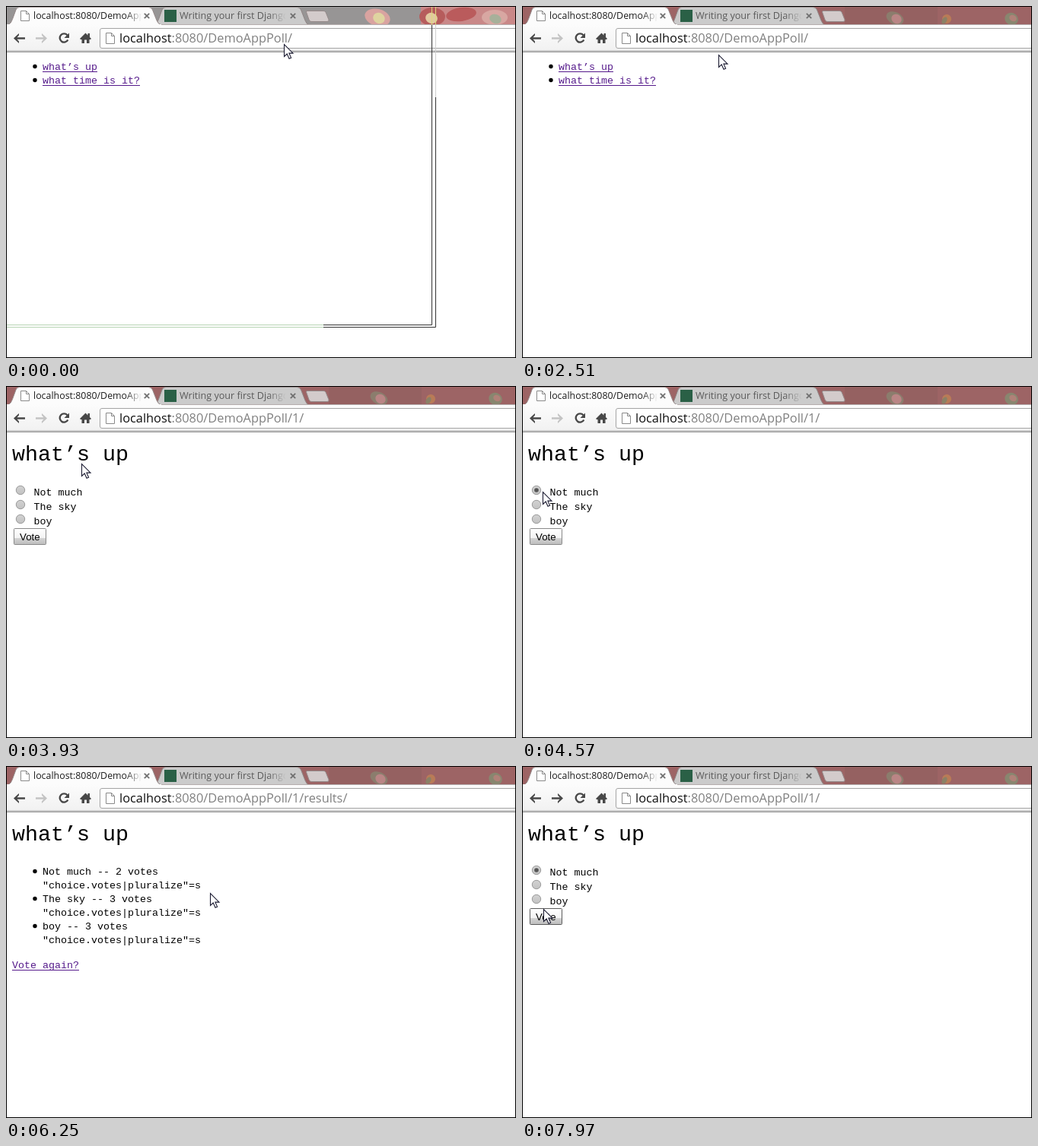
An HTML page that plays this animation: 670x463 px, repeating every 8 s.

```html
<!DOCTYPE html>
<html lang="en">
<head>
<meta charset="utf-8">
<title>Poll demo</title>
<style>
html, body { margin: 0; width: 100%; height: 100%; overflow: hidden; background: #fff; }
svg { display: block; width: 670px; height: 463px; }
text { white-space: pre; }
.mono { font: 13.333px "Liberation Mono", monospace; }
.head { font: 28.333px "Liberation Mono", monospace; }
.ui { font: 12.4px "Open Sans", "Noto Sans", sans-serif; }
.url { font: 16.36px "Open Sans", "Noto Sans", sans-serif; }
.btn { font: 13.333px "Liberation Sans", Arial, sans-serif; }
</style>
</head>
<body>
<svg id="stage" viewBox="0 0 670 463" xmlns="http://www.w3.org/2000/svg"></svg>
<script>
const LOOP = 8000;
const PURPLE = '#551a8b';
const stage = document.getElementById('stage');
const $ = id => document.getElementById(id);

// Drawing helpers that return markup
const rect = (x, y, w, h, fill, more = '') =>
  `<rect x="${x}" y="${y}" width="${w}" height="${h}" fill="${fill}" ${more}/>`;
const path = (d, fill, more = '') => `<path d="${d}" fill="${fill}" ${more}/>`;
const line = (d, color, width, more = '') =>
  path(d, 'none', `stroke="${color}" stroke-width="${width}" ${more}`);
const text = (cls, x, y, str, fill = '#000', more = '') =>
  `<text class="${cls}" x="${x}" y="${y}" fill="${fill}" ${more}>${str}</text>`;
const blob = (x, y, rx, ry, fill, turn = 0) =>
  `<ellipse cx="${x}" cy="${y}" rx="${rx}" ry="${ry}" fill="${fill}" transform="rotate(${turn} ${x} ${y})"/>`;
const dot = (x, y, r, fill, more = '') =>
  `<circle cx="${x}" cy="${y}" r="${r}" fill="${fill}" ${more}/>`;
const group = (id, body) => `<g id="${id}">${body}</g>`;
const link = (id, x, y, str) => `<g id="${id}" fill="${PURPLE}">` +
  text('mono', x, y, str, 'inherit').replace('fill="inherit"', '') +
  `<rect x="${x}" y="${y + 2}" width="${str.length * 8}" height="1"/></g>`;
const ramp = (id, x1, x2, color) =>
  `<linearGradient id="${id}" gradientUnits="userSpaceOnUse" x1="${x1}" x2="${x2}">
   <stop stop-color="${color}"/><stop offset="1" stop-color="${color}" stop-opacity="0"/></linearGradient>`;
const shade = (id, stops) =>
  `<linearGradient id="${id}" x2="0" y2="1">` +
  stops.map(([at, c]) => `<stop offset="${at}" stop-color="${c}"/>`).join('') + '</linearGradient>';
const sheet = (x, y, w, h) =>
  path(`M${x + .5} ${y + .5}h${w - 5}l4 4v${h - 5}h${1 - w}z`, '#fff', 'stroke="#8a8a8a"') +
  line(`M${x + w - 4.5} ${y + .5}v4h4`, '#8a8a8a', 1);
const cross = (x, y, r, color, width) =>
  line(`M${x - r} ${y - r}l${2 * r} ${2 * r}M${x + r} ${y - r}l${-2 * r} ${2 * r}`, color, width);

function desktop() {
  const early = rect(0, 0, 670, 25, '#979595') +
    rect(545, 0, 125, 25, '#c98888') +
    blob(488, 15, 17, 11, '#d9a3a0', 15) + blob(490, 16, 8, 7, '#dfd3a0', 30) +
    blob(560, 14, 17, 12, '#b65c5c') + blob(559, 16, 8, 7, '#e2c9a0', 20) +
    blob(598, 11, 20, 9, '#ba5b5c', -8) + blob(642, 15, 17, 10, '#d8a7a2') +
    blob(643, 17, 8, 6, '#a7b09a', 20);
  const late = rect(0, 0, 670, 25, '#9d6465') + rect(424, 1, 122, 24, '#956161') +
    blob(490, 16, 12, 8, '#8b7d6d', 25) + blob(492, 17, 7, 6, '#ba8585', 35) +
    blob(558, 17, 6, 6, '#b97b57', 30) + blob(555, 19, 3, 5, '#8a8166', 30) +
    blob(643, 17, 9, 8, '#88866f', 25) + blob(645, 16, 5, 4, '#b08178', 30);
  return group('early', early) + group('late', late);
}

function chrome() {
  const tabs =
    path('M194 25C198 24 199 21 201 16L205 5Q206 1.5 210 1.5H382Q386 1.5 387.500 5L393 19Q395 24 398 25z', '#cbcbcb', 'stroke="#8f8484"') +
    path('M394.500 8Q394 6.500 396 6.500H417Q419 6.500 420 8L424 18Q424.500 20.500 422 20.500H401Q399 20.500 398 18z', '#d3cbcb', 'stroke="#958a8a"') +
    path('M1 25C6 24 7 21 9 16L13 5Q14 1.500 18 1.500H187Q191 1.500 192.500 5L198 19Q200 24 204 25z', '#fcfcfc', 'stroke="#958989"');
  const bar = rect(1, 24, 668, 36, 'url(#barFill)') +
    rect(204, 24, 466, 1, '#b5adad') + rect(1, 58, 668, 1, '#d0d0d0') +
    rect(1, 59, 668, 1, '#c4c4c4') + rect(1, 60, 668, 1, '#929292') +
    path('M670 29.500H126Q123.500 29.500 123.500 32V53Q123.500 55.500 126 55.500H670', '#fff', 'stroke="#a4a4a4"');
  const arrow = 'M0 0L7 -6.500V-4L4.500 -1.300H15V1.300H4.500L7 4V6.500z';
  const nav =
    group('hover', rect(4.5, 29.5, 26, 26, '#fff', 'rx="2" stroke="#a9a9a9"')) +
    path(arrow, '#484848', 'transform="translate(10 42.500)"') +
    `<g id="fwd" transform="translate(54 42.500) scale(-1 1)">${path(arrow, 'inherit').replace('fill="inherit"', '')}</g>` +
    group('reload', line('M80.500 38.300A5.600 5.600 0 1 0 81.300 44.500', '#484848', 2.4) +
      path('M83 35.500V42H76.500z', '#484848')) +
    group('stop', cross(75.5, 42.5, 5, '#484848', 3)) +
    path('M97 43L104.500 35.500L107.500 38.500V36H110V41L112 43L111 44H109.500V49H106V44.500H103V49H99.500V44H98z', '#484848');
  const labels =
    group('favicon', sheet(19, 6, 12, 14)) +
    group('spinner', line('M24 7A6.500 6.500 0 0 1 30.500 17', '#a8a8a8', 1.8)) +
    text('ui', 36, 17, 'localhost:8080/DemoAppPoll', 'url(#fade1)') +
    cross(185, 13, 3.2, '#707070', 1.8) +
    rect(208, 5, 16, 16, '#2a6046') +
    text('ui', 228, 17, 'Writing your first Django', 'url(#fade2)', 'style="font-size:12.6px"') +
    cross(377, 13, 3.2, '#707070', 1.8) +
    sheet(131, 35, 12, 15);
  const address = group('mark', rect(149, 31, 228, 21, '#3399ff')) +
    `<text class="url" x="149" y="48"><tspan id="host">localhost</tspan><tspan id="rest"></tspan></text>` +
    group('caret', rect(376, 31, 1, 21, '#000'));
  return tabs + bar + nav + labels + address;
}

function pages() {
  const list = dot(38, 79.5, 2.7, '#000') + dot(38, 97.5, 2.7, '#000') +
    link('ask', 48, 84, 'what’s up') + link('time', 48, 102, 'what time is it?');
  const title = text('head', 8, 98, 'what’s up');
  const choices = ['Not much', 'The sky', 'boy'];
  const form = title + choices.map((c, i) =>
    dot(19, 137 + 19 * i, 5.7, 'url(#radioFill)', 'stroke="#9b9b9b"') +
    text('mono', 36.5, 144 + 19 * i, c)).join('') +
    group('picked', dot(19, 137, 2.8, '#555')) +
    rect(10.5, 187.5, 42, 21, 'url(#btnFill)', 'id="vote" rx="1"') +
    text('btn', 18, 203, 'Vote');
  const results = title + choices.map((c, i) => {
    const y = 143 + 36 * i;
    return dot(38, y - 4.5, 2.7, '#000') +
      text('mono', 48, y, `${c} -- ${i ? 3 : 2} votes`) +
      text('mono', 48, y + 18, '"choice.votes|pluralize"=s');
  }).join('') + link('again', 8, 266, 'Vote again?');
  return group('list', list) + group('form', form) + group('results', results);
}

const outline = group('outline',
  line('M559.500 1V25M564.500 1V25', '#dcd77c', 1) +
  line('M564.500 25V120', '#cfcfcf', 1) +
  line('M559.500 25V419.500H417M564.500 120V422.500H417', '#333', 1) +
  line('M1 419.500H417M1 422.500H417', '#b5d3b2', 1));

stage.innerHTML = '<defs>' + ramp('fade1', 158, 178, '#1c1c1c') + ramp('fade2', 345, 368, '#595959') +
  shade('barFill', [[0, '#fcfcfc'], [1, '#f1f1f1']]) +
  shade('radioFill', [[0, '#d2d2d2'], [1, '#c2c2c2']]) +
  shade('btnFill', [[0, '#fff'], [.6, '#f3f3f3'], [.62, '#d2d2d2'], [1, '#bdbdbd']]) + '</defs>' +
  rect(0, 0, 670, 463, '#fff') + desktop() + chrome() + pages() + outline +
  group('cursor', path('M.5 .5V16.500L4.200 13L7 19.300L9.600 18.200L6.900 12.100H12z', '#fff',
    'stroke="#1d1d33" stroke-width="1.100"')) +
  rect(.5, .5, 669, 462, 'none', 'stroke="#000"');

// Pointer moves: start, end, number of jumps, target x, target y
const moves = [
  [100, 330, 5, 398, 45], [1700, 1700, 1, 290, 60], [2510, 2800, 6, 96, 82],
  [3690, 3760, 2, 109, 97], [3930, 4330, 8, 27, 139], [4610, 4740, 3, 30, 193],
  [5060, 5210, 4, 172, 176], [5360, 5440, 3, 272, 168], [6250, 6250, 1, 268, 167],
  [6310, 6930, 11, 18, 45], [7130, 7190, 2, 26, 57], [7230, 7850, 11, 31, 183],
  [7910, 7970, 2, 28, 188]
];

function pointer(t) {
  let x = 365, y = 50;
  for (const [from, to, n, tx, ty] of moves) {
    if (t < from) break;
    const jump = n > 1 ? Math.floor((t - from) / (to - from) * (n - 1) + 1e-6) + 1 : 1;
    const k = Math.min(1, jump / n);
    x += (tx - x) * k;
    y += (ty - y) * k;
  }
  return [Math.round(x), Math.round(y)];
}

const show = (id, on) => { $(id).style.display = on ? '' : 'none'; };

function draw(t) {
  const within = (a, b) => t >= a && t < b;
  const view = t < 3320 ? 'list' : within(5360, 7060) ? 'results' : 'form';
  const loading = within(3220, 3460) || within(5000, 5440) || within(7000, 7060);
  const marked = within(470, 570);
  const [x, y] = pointer(t);

  show('early', t < 100);
  show('late', t >= 100);
  show('outline', t < 100);
  for (const id of ['list', 'form', 'results']) show(id, id === view);

  show('favicon', !loading);
  show('spinner', loading);
  show('reload', !loading);
  show('stop', loading);
  const turn = -Math.floor((t - 3220) / 70) * 40;
  $('spinner').setAttribute('transform', `rotate(${turn} 25 13)`);

  show('hover', within(6860, 7250));
  $('fwd').setAttribute('fill', t >= 7060 ? '#484848' : '#c3c3c3');
  show('mark', marked);
  show('caret', within(570, 1330));
  $('host').setAttribute('fill', marked ? '#fff' : '#111');
  $('rest').setAttribute('fill', marked ? '#fff' : '#808080');
  $('rest').textContent = ':8080/DemoAppPoll/' + { list: '', form: '1/', results: '1/results/' }[view];

  $('ask').setAttribute('fill', within(3040, 3220) ? '#e00000' : PURPLE);
  show('picked', t >= 4450);
  const over = x >= 10 && x < 53 && y >= 186 && y < 209;
  $('vote').setAttribute('stroke', over ? '#5c5c5c' : '#8a8a8a');
  $('cursor').setAttribute('transform', `translate(${x} ${y})`);
}

const begin = performance.now();
function tick() {
  draw((performance.now() - begin) % LOOP);
  requestAnimationFrame(tick);
}
tick();
</script>
</body>
</html>
```
